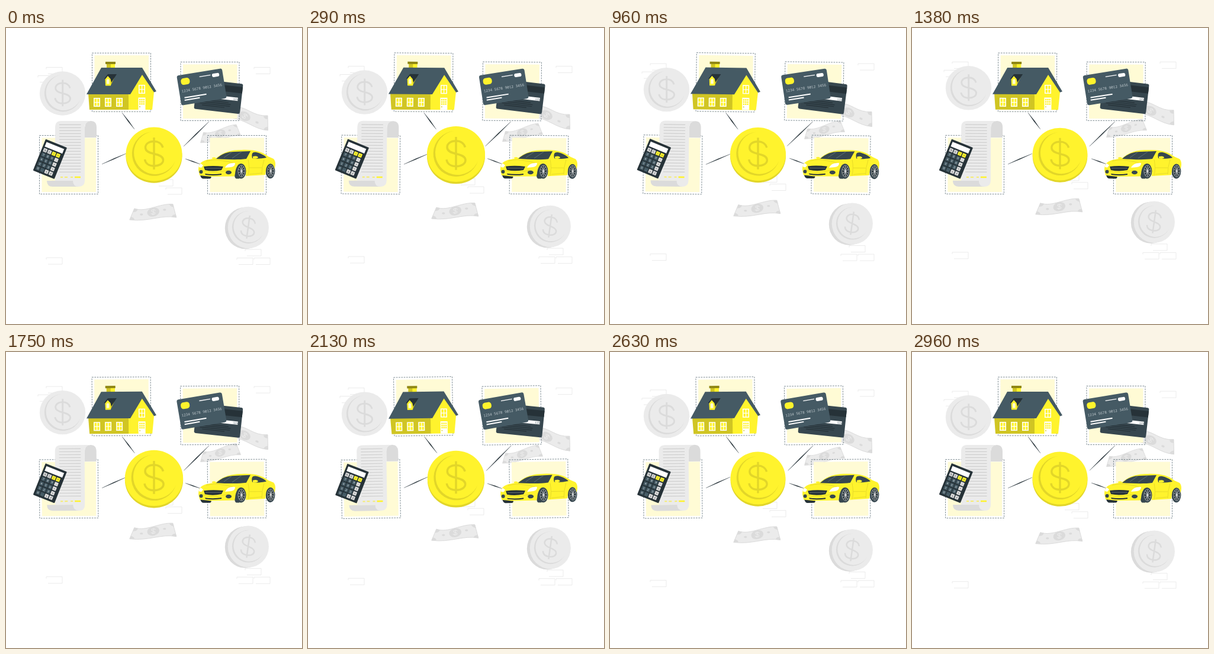
An HTML page for the animation above (3000 ms loop, 500 by 500 pixels).

```html
<!DOCTYPE html>
<html lang="en">
<head>
<meta charset="utf-8">
<title>Assets</title>
<style>
  html, body { margin: 0; width: 100%; height: 100%; overflow: hidden; background: #fff; }
  svg { display: block; width: 100vw; height: 100vh; }
  .y { fill: #fff32d; } .dy { fill: #d0c523; } .w { fill: #fff; }
  .d { fill: #455a64; } .d2 { fill: #37474f; } .d3 { fill: #263238; }
  .g { fill: #ebebeb; } .g2 { fill: #dbdbdb; }
  .pale { fill: #fffbd5; }
  .dash { fill: none; stroke: #455a64; stroke-width: .7; stroke-dasharray: 2.6 1.7; }
  .link { fill: #263238; stroke: #263238; stroke-width: .25; }
  .brick { fill: none; stroke: #e6e6e6; stroke-width: .8; }
  .sign { fill: none; stroke-width: 3.4; }
  .white { fill: none; stroke: #fff; }
  .grey { stroke: #dbdbdb; fill: #dbdbdb; }
  .gold { stroke: #e2d629; fill: #e2d629; }
</style>
</head>
<body>
<svg viewBox="0 0 500 500">
  <defs>
    <g id="mark">
      <path stroke="none" d="M-3-38A37.5 37.5 0 1 0 36 11A36.2 36.2 0 1 1-3-38Z"/>
      <path class="sign" d="M0-28V26M15-11C13-18 7-21.5 0-21.5C-9-21.5-14.5-17-14.5-11C-14.5-5-9-2.5 0-.5C9 1.5 15.5 4 15.5 10C15.5 16 9 20 0 20C-9 20-14.5 15.5-15.5 9"/>
    </g>
    <g id="seal">
      <ellipse class="g2" rx="10.5" ry="7.5" transform="rotate(-14)"/>
      <path d="M1-5L-1 5M4-2.5C2-5-3-4-3-2C-3 0 3-1 3 1.8C3 4-2 4.5-4 2" fill="none" stroke="#ebebeb" stroke-width="1.1"/>
    </g>
    <g id="bill">
      <path class="g" stroke="#dbdbdb" d="M-32-6C-12 1 10-15 33-13.5L39 9C13 4-7 17-40 13Z"/>
      <path class="g2" d="M-32-6L-26-5Q-27 0-34 0ZM33-13.5L27-13Q29-9 35-8ZM39 9L31 8Q32 4 38 4ZM-40 13L-32 13Q-32 9-38 8Z"/>
      <use href="#seal"/>
      <ellipse class="g2" cx="-20" cy="4" rx="2.6" ry="1.7"/>
      <ellipse class="g2" cx="19" cy="-4" rx="2.6" ry="1.7"/>
    </g>
    <g id="pane">
      <rect class="w" width="11" height="15"/>
      <path class="y" d="M1.5 1.5H5V7H1.5ZM6.2 1.5H9.5V7H6.2ZM1.5 8.2H5V13.5H1.5ZM6.2 8.2H9.5V13.5H6.2Z"/>
    </g>
    <g id="frame">
      <rect class="pale" x="4" y="4" width="91.5" height="91.5"/>
      <rect class="dash" width="99" height="99"/>
    </g>
    <g id="wheel">
      <ellipse class="d2" rx="9" ry="12.8"/>
      <ellipse class="d3" cx=".8" rx="6.2" ry="9.8" stroke="#b9bfc2" stroke-width=".8"/>
      <path d="M.8-9V9M-4.6-3L6.2 3M-4.6 3L6.2-3M-2.5-7.5L4.1 7.5M-2.5 7.5L4.1-7.5" stroke="#cfd3d5" stroke-width=".9"/>
      <ellipse class="g2" cx=".8" rx="1.4" ry="2"/>
    </g>
  </defs>

  <g id="float">
    <g id="bricks"></g>
    <ellipse class="g" cx="95.5" cy="110.5" rx="38.7" ry="37.2"/>
    <use href="#mark" class="grey" transform="translate(95.7 110.8) scale(.83)"/>
    <ellipse class="g2" cx="404" cy="338" rx="34.2" ry="35.2"/>
    <ellipse class="g" cx="409.3" cy="337" rx="34.6" ry="35.2"/>
    <use href="#mark" class="grey" transform="translate(409 337) rotate(8) scale(.73)"/>
    <use href="#bill" transform="translate(248.8 311)"/>
    <use href="#bill" transform="translate(361.8 178.3) rotate(-7) scale(.87)"/>
    <path class="g" stroke="#dbdbdb" d="M388 134C407 132 417 150 442 148L442.5 173C418 171 407 155 380 152Z"/>
    <path class="g2" d="M442 148L435 149Q436 154 442 154ZM442.5 173L435 172Q437 167 442 167Z"/>
    <use href="#seal" transform="translate(403 149) rotate(44)"/>
    <ellipse class="g2" cx="424" cy="159.5" rx="2.8" ry="1.8" transform="rotate(20 424 159.5)"/>
  </g>

  <g class="sway" data-c="195 107">
    <path class="link" d="M196 143Q207.7 156 217 171Q205.300 158 196 143Z"/>
    <use href="#frame" x="145.5" y="42.3"/>
    <path class="dy" d="M139 111H208V138H141Z"/>
    <path class="y" d="M230 78L250 108L247 138H207V112Z"/>
    <path class="dy" d="M170 60H184V68H170Z"/>
    <path class="y" d="M177 60H184V68H177Z"/>
    <path fill="#8f8714" d="M168 57H185V61H168Z"/>
    <path class="d" d="M161 67H230L254 107L250 108.5L230 79L210 112H136Z"/>
    <path class="dy" d="M172 81L183 84L177 97H172Z"/>
    <path class="y" d="M167.5 86L172 80L177 86V97.5H168Z"/>
    <path class="d3" d="M172 78H187L178 92L176.5 86L172 81L167.5 86.500L166 85.5Z"/>
    <path fill="#fffbd5" d="M170 88Q172.3 84 174.5 88V94.5H170Z"/>
    <use href="#pane" x="148" y="118"/>
    <use href="#pane" x="167" y="118"/>
    <use href="#pane" x="186" y="118"/>
    <use href="#pane" x="224" y="96"/>
    <path class="w" d="M223.5 117.5H235.5V138H223.5Z"/>
    <path d="M225 121H234M225 124.7H234M225 128.3H234" stroke="#fff32d" stroke-width="2.5" stroke-dasharray="2.4 .9"/>
    <circle cx="226" cy="133" r=".9" class="dy"/>
  </g>

  <g class="sway" data-c="344 129">
    <path class="link" d="M343 158Q322.6 180 300 200Q320.4 178 343 158Z"/>
    <use href="#frame" x="295" y="57.5"/>
    <g transform="translate(359 115.5) rotate(6.5)">
      <rect class="d2" x="-39" y="-25.5" width="78" height="51" rx="3"/>
      <path class="d3" d="M-39-20H39V-9.5H-39Z"/>
      <path class="w" d="M-25-1.5H33V4H-25Z"/>
      <text x="25" y="3.1" font-size="4.5" fill="#455a64" font-family="Lato, sans-serif">123</text>
      <path d="M-34 8.5H18M-30 11.5H22M-30 14.5H21M-26 17.5H12" stroke="#263238" stroke-width="1.2"/>
    </g>
    <g transform="translate(330.5 99.5) rotate(-9.3)">
      <rect class="d" x="-38.7" y="-25.5" width="77.5" height="51" rx="3.5"/>
      <rect class="y" x="-33.2" y="-19.3" width="15" height="11" rx="4.5"/>
      <rect class="w" x="20.4" y="-19" width="12.2" height="6" rx="2.6"/>
      <path class="white" stroke-width="1.3" d="M-1-17.5H18"/>
      <path class="white" stroke-width="2" d="M-31.5 13.3H6M-32 17.5H-6"/>
      <text x="-34.6" y="4" font-size="6.05" font-weight="300" fill="#c3ccd0" font-family="'Noto Sans Mono', monospace">1234 5678 9012 3456</text>
    </g>
  </g>

  <g class="sway" data-c="124 219">
    <path class="link" d="M162 230Q182.5 222.2 203 212Q181.5 219.8 162 230Z"/>
    <use href="#frame" x="56.5" y="181.5"/>
    <path class="g2" d="M133 185V168Q134 157 143 157Q153 157 153 168V185ZM69 258H115L123 268H79Q69 268 69 258Z"/>
    <path class="g" d="M83 168Q83 157 93 157H143Q133 158 133 168V258Q133 268 123 268Q113 268 113 258H83Z"/>
    <g id="rows" stroke="#cfcfcf" stroke-width="1.2"></g>
    <path d="M92 252H96M99 252H104M109 252H113" stroke="#f5ec74" stroke-width="2"/>
    <path d="M116 252H126" stroke="#fff32d" stroke-width="2.6"/>
    <g id="calc" transform="translate(67 187.7) rotate(22)">
      <rect class="d3" width="38.8" height="57" rx="1"/>
      <rect class="w" x="3.2" y="3.8" width="32" height="8.4"/>
    </g>
  </g>

  <g class="sway" data-c="379 231">
    <path class="link" d="M303 221Q315 226.7 328 230Q316 224.300 303 221Z"/>
    <use href="#frame" x="340.5" y="181.5"/>
    <path class="d3" d="M328 248H346Q348 254 344 254.5H333Q329 254 328 248Z"/>
    <path class="d2" d="M386 247Q386 229 397 229L394 254.5H389Q386 254 386 247Z"/>
    <use href="#wheel" transform="translate(446.5 241.5) scale(.88 1)"/>
    <path class="y" d="M325 240C325 230 329 226 338 223L355 220C365 212 375 206 398 206C420 205 433 209 443 217L452 221C456 225 455.5 233 453.5 238C452 227 443 226 439.5 237L438 248L405 250C408 228 389 222 387 246L386 250.5L345 251L327 249Z"/>
    <path class="d2" d="M355 221C365 212 375 209 386 209L413 208L406 221C392 223 372 222 355 221ZM416 220C414 211 417 209 423 210C431 212 438 216 440 219C430 221 422 221 416 220Z"/>
    <path d="M368 219L381 210M382 220L398 209" stroke="#53666f"/>
    <path class="y" d="M348 219Q353 217 355 220L353 222Q348 222 348 219ZM417 217Q425 215 426 219Q422 222 417 220Z"/>
    <path d="M338 225Q353 221 365 224Q376 225 386 229M409 222Q412 237 409 249M436 222Q432 235 432 247M411 236H432M411 247L432 245M330 240Q350 248 374 240" fill="none" stroke="#ddd127" stroke-width=".7"/>
    <path class="d3" d="M334 234Q349 232 367 234L364 240Q349 243 336 240ZM336 246Q350 248 364 246V248Q350 250 337 248Z"/>
    <path d="M337 237H364" stroke="#7b858a" stroke-width=".7"/>
    <path class="w" d="M370 236Q374 227 387 228Q387 234 380 235ZM326 235Q326 231 329 229L333 232L330 236Z"/>
    <ellipse class="d2" cx="376" cy="244" rx="5" ry="3.3"/>
    <ellipse class="d2" cx="329.5" cy="243" rx="3" ry="3"/>
    <use href="#wheel" transform="translate(397 241.7) scale(.94 1)"/>
  </g>

  <g id="coin">
    <ellipse class="gold" stroke="none" cx="250" cy="216.2" rx="47.5" ry="45.600" style="stroke: none"/>
    <ellipse class="y" cx="250" cy="213" rx="47.5" ry="45.5"/>
    <use href="#mark" class="gold" transform="translate(250 213)"/>
  </g>
</svg>
<script>
const $ = id => document.getElementById(id);
const add = (parent, html) => parent.insertAdjacentHTML('beforeend', html);

const bricks = [[68, 66.5], [54, 80.5], [419, 66.5], [255, 256], [270, 270], [68, 388], [404, 374], [390, 388.5], [419, 388.5]];
for (const [x, y] of bricks) add($('bricks'), `<path class="brick" d="M${x} ${y + 3}V${y}h27v11h-24"/>`);

for (let i = 0; i < 17; i++) add($('rows'), `<path d="M90 ${163.3 + i * 5}H126.5"/>`);

const labels = '%C/×789-456+123=0.±√';
for (let i = 0; i < 20; i++) {
  const col = i % 4, row = i >> 2, x = 6.4 + col * 7.8, y = 17.8 + row * 8.2;
  const light = col === 3 || row === 0 || (row === 4 && col === 2);
  const fill = row === 0 && col > 1 ? '#fff32d' : light ? '#dbdbdb' : '#455a64';
  add($('calc'), `<rect x="${x - 3.2}" y="${y - 3.2}" width="6.4" height="6.4" rx=".7" fill="${fill}"/>
    <text x="${x}" y="${y + 1.6}" text-anchor="middle" font-size="4.4" font-family="Lato, sans-serif" fill="${light ? '#263238' : '#fff'}">${labels[i]}</text>`);
}

// Linear interpolation through [time, value] stops
function track(stops, t) {
  const i = stops.findIndex(s => s[0] > t);
  const [t0, v0] = stops[i - 1], [t1, v1] = stops[i];
  return v0 + (v1 - v0) * (t - t0) / (t1 - t0);
}
const rise = [[0, 0], [.5, -10], [1, 0]];
const sway = [[0, 0], [.25, 1], [.75, -1], [1, 0]];
const beat = [[0, 1], [.1, 1.04], [.42, 1.014], [.75, .977], [.97, .975], [1, 1]];
const swaying = document.querySelectorAll('.sway');

function draw() {
  const p = performance.now() % 3000 / 3000;
  $('float').setAttribute('transform', `translate(0 ${track(rise, p)})`);
  for (const g of swaying) g.setAttribute('transform', `rotate(${track(sway, p)} ${g.dataset.c})`);
  $('coin').setAttribute('transform', `translate(250 214.7) scale(${track(beat, p * 2 % 1)}) translate(-250 -214.7)`);
  requestAnimationFrame(draw);
}
draw();
</script>
</body>
</html>
```
